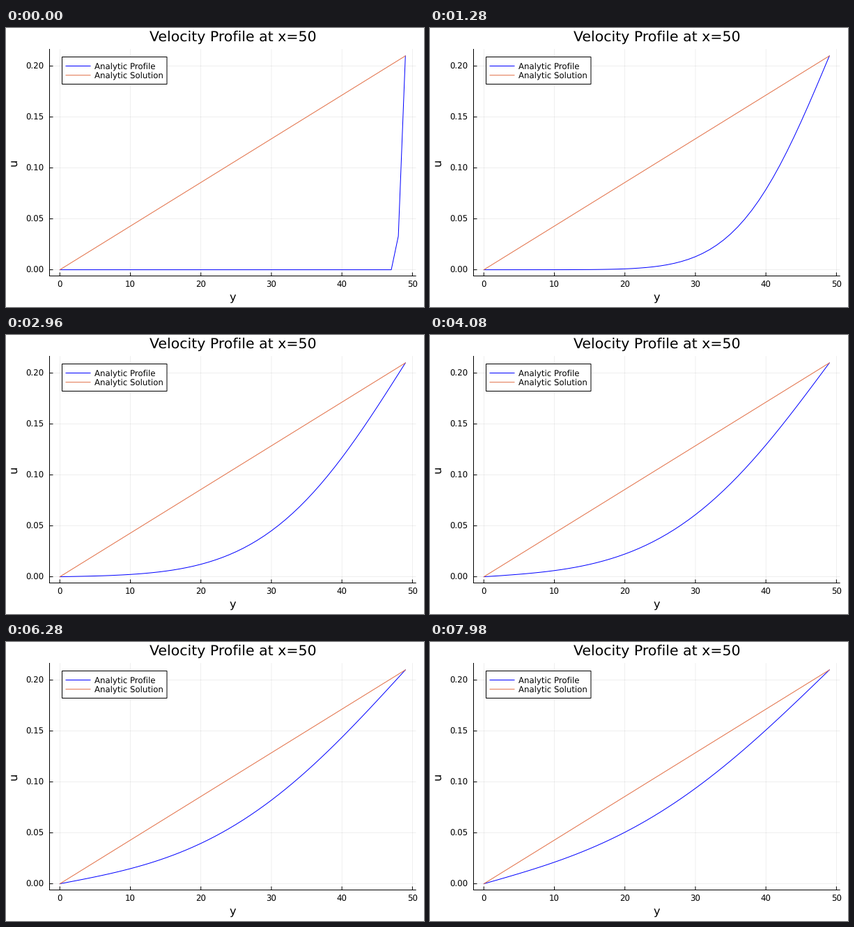
Write a matplotlib script that moves like this. It is 600 px wide and 400 px high and loops after 8000 ms.

```python
import numpy as np
import matplotlib.pyplot as plt
from matplotlib.animation import FuncAnimation
from matplotlib.patches import Rectangle

W, H, DPI = 600, 400, 100
PT = 72 / DPI                      # points per pixel
LEFT, RIGHT, TOP, BOTTOM = 62.5, 588.2, 30.5, 355.5
BLUE, ORANGE = "#0000ff", "#e26f46"
N, U_WALL = 50, 0.21
STEPS, RATE, FIRST = 10, 0.183, 0.157
TICKS, PROFILES = 400, 172

plt.rcParams["font.family"] = "DejaVu Sans"
plt.rcParams["text.hinting"] = "no_hinting"


def px(y):
    return 77.3 + 10.122 * np.asarray(y)


def py(u):
    return 346.6 - 1460.1 * np.asarray(u)


def diffuse(u, rate):
    v = u.copy()
    v[1:-1] += rate * (u[2:] - 2 * u[1:-1] + u[:-2])
    return v


def solve():
    """Momentum diffusing from the moving wall into fluid at rest."""
    u = np.zeros(N)
    u[-1] = U_WALL
    u = diffuse(u, FIRST)
    out = [u]
    while len(out) < PROFILES:
        for _ in range(STEPS):
            u = diffuse(u, RATE)
        out.append(u)
    return out


fig = plt.figure(figsize=(W / DPI, H / DPI), dpi=DPI, facecolor="white")
ax = fig.add_axes([0, 0, 1, 1])
ax.set_xlim(0, W)
ax.set_ylim(H, 0)
ax.axis("off")


def line(xs, ys, color="black", width=1.0, **kw):
    return ax.plot(xs, ys, color=color, lw=width * PT, snap=False, **kw)[0]


def label(x, y, text, size, ha="center", **kw):
    ax.text(x, y, text, fontsize=size * PT, ha=ha, va="baseline", **kw)


for v in range(0, 51, 10):
    x = px(v)
    line([x, x], [TOP, BOTTOM], width=0.6, alpha=0.1)
    line([x, x], [BOTTOM, BOTTOM - 5], solid_capstyle="butt")
    label(x, 372, str(v), 11.8)
for v in np.arange(5) * 0.05:
    y = py(v)
    line([LEFT, RIGHT], [y, y], width=0.6, alpha=0.1)
    line([LEFT, LEFT + 5], [y, y], solid_capstyle="butt")
    label(54, y + 4.3, f"{v:.2f}", 11.8, ha="right")
line([LEFT, LEFT], [TOP, BOTTOM])
line([LEFT, RIGHT], [BOTTOM, BOTTOM])

label(325.6, 18.5, "Velocity Profile at x=50", 20.5)
label(325.3, 391.5, "y", 16.2)
label(16.5, 193, "u", 16.2, rotation=90, rotation_mode="anchor")

cells = np.arange(N)
profile = line(px(cells), py(0 * cells), BLUE)
line(px([0, N - 1]), py([0, U_WALL]), ORANGE)

ax.add_patch(Rectangle((80.5, 41.5), 150.5, 39, fc="white", ec="black",
                       lw=PT, snap=False, zorder=3))
for y, text, color in ((54.5, "Analytic Profile", BLUE),
                       (67.7, "Analytic Solution", ORANGE)):
    line([86, 121], [y, y], color, zorder=4)
    label(126.8, y + 4.3, text, 11.8, ha="left", zorder=4)

curves = solve()


def update(k):
    # three profiles per seven ticks: one held for five, two for one each
    q, r = divmod(k - 1, 7)
    i = 1 + 3 * q + max(0, r - 4)
    profile.set_ydata(py(curves[i]))
    return [profile]


anim = FuncAnimation(fig, update, frames=TICKS, interval=20,
                     init_func=lambda: update(0), repeat=True, repeat_delay=0)
plt.show()
```
